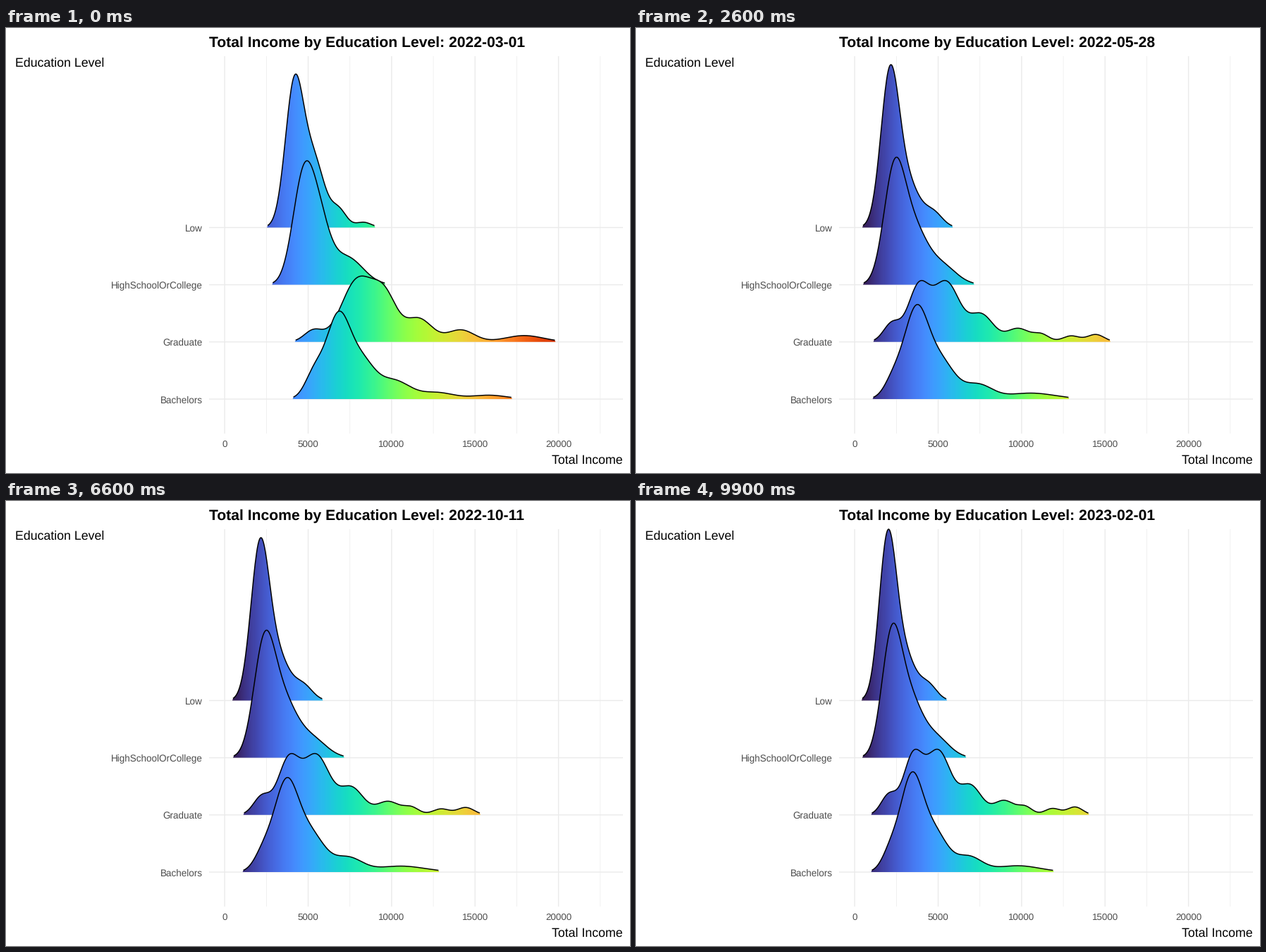
Animation of 885x632 px, one loop 10 s. Source, as a matplotlib script:

```python
import numpy as np
import matplotlib.pyplot as plt
from matplotlib.animation import FuncAnimation
from matplotlib.path import Path

W, H, DPI = 885, 632, 100
FRAMES, INTERVAL = 100, 100
LEFT, RIGHT, TOP, BOTTOM = 288, 875, 40, 576
ZERO, STEP = 310.2, 118.35          # x of income 0, pixels per 5000
LOW, HIGH = 314.7, 848.3            # ends of the colour scale
BASE, ROW = 283.4, 81.2             # first baseline and ridge spacing
CUT = 0.01 * 3 * ROW                # tails lower than this are hidden
GREY = "#4D4D4D"

plt.rcParams["font.family"] = ["Liberation Sans", "DejaVu Sans"]
plt.rcParams["text.hinting"] = "none"

# Each ridge is a sum of bell curves (centre, height, width):
# name, response to the income level, first month, typical later month
GROUPS = [
    ("Low", 0.75,
     [(409, 200, 13), (437, 92, 15), (472, 24, 11), (507, 7.5, 11)],
     [(360, 209, 13), (385, 62, 17), (422, 20, 13)]),
    ("HighSchoolOrCollege", 0.8,
     [(422, 148, 15.5), (445, 69, 15), (483, 39, 23)],
     [(366, 150, 15), (393, 75, 19), (433, 27, 21)]),
    ("Graduate", 1.0,
     [(436, 16, 13), (499, 88, 23), (538, 56, 17), (585, 33, 19),
      (645, 17, 19), (735, 9, 27)],
     [(363, 26, 12), (400.5, 75, 15), (440, 84, 19), (490, 38, 17),
      (542, 19, 16), (575, 10, 11), (617, 8.5, 12), (652, 10.5, 12)]),
    ("Bachelors", 0.87,
     [(437, 34, 13), (471, 115, 17), (505, 48, 18), (550, 26, 23),
      (612, 9, 23), (685, 5.5, 25)],
     [(365, 25, 13), (397, 121, 17), (432, 52, 20), (485, 20, 20),
      (560, 8.5, 34)]),
]

# Later months whose income level is not the typical one
LEVELS = {"2022-04": 0.97, "2022-08": 1.05, "2023-01": 1.03, "2023-02": 0.914}

START = np.datetime64("2022-03-01")
MONTHS = np.arange("2022-03", "2023-03", dtype="datetime64[M]")
DAYS = (MONTHS.astype("datetime64[D]") - START).astype(int)
SPAN = int(DAYS[-1])
KEYS = np.round(DAYS * (FRAMES - 1) / SPAN).astype(int)

X = np.linspace(LOW, HIGH, 512)


def ridge(bells, stretch=1.0):
    """Sum of bells, stretched from income 0 and lowered to match."""
    x = ZERO + (X - ZERO) / stretch
    total = sum(h * np.exp(-0.5 * ((x - c) / w) ** 2) for c, h, w in bells)
    return total * stretch ** -0.75


def month_shapes(month):
    if month == MONTHS[0]:
        return [ridge(first) for _, _, first, _ in GROUPS]
    level = LEVELS.get(str(month), 1.0)
    return [ridge(later, level ** power) for _, power, _, later in GROUPS]


SHAPES = np.array([month_shapes(m) for m in MONTHS])


def heights_at(frame):
    k = min(np.searchsorted(KEYS, frame, side="right") - 1, len(KEYS) - 2)
    t = (frame - KEYS[k]) / (KEYS[k + 1] - KEYS[k])
    return (1 - t) * SHAPES[k] + t * SHAPES[k + 1]


fig = plt.figure(figsize=(W / DPI, H / DPI), dpi=DPI, facecolor="white")
ax = fig.add_axes([0, 0, 1, 1])
ax.axis("off")


def px(size):
    return size * 72 / DPI


def label(x, y, text, size, **kw):
    return ax.text(x, y, text, fontsize=px(size), va="baseline", **kw)


def grid(xs, ys, width):
    ax.plot(xs, ys, color="#EBEBEB", lw=px(width), solid_capstyle="butt",
            snap=False, zorder=1)


for n in range(5):
    x = ZERO + n * STEP
    grid([x + STEP / 2] * 2, [TOP, BOTTOM], 0.7)
    grid([x, x], [TOP, BOTTOM], 1.4)
    label(x, 595, str(5000 * n), 13.4, ha="center", color=GREY)

ramp = np.linspace(0, 1, 1024)[None, :]
bases = BASE + ROW * np.arange(len(GROUPS))
fills, lines = [], []
for n, base in enumerate(bases):
    grid([LEFT, RIGHT], [base, base], 1.4)
    label(279, base + 5.4, GROUPS[n][0], 13.5, ha="right", color=GREY)
    fills.append(ax.imshow(ramp, cmap="turbo", aspect="auto", zorder=2 + n,
                           extent=(LOW, HIGH, H, 0), interpolation="nearest"))
    lines += ax.plot([], [], color="black", lw=px(1.5), zorder=2.5 + n,
                     solid_capstyle="butt")

label(13, 54.5, "Education Level", 17.8)
label(875, 618.7, "Total Income", 17.8, ha="right")
title = label(288.5, 26.5, "", 21.1, weight="bold")
ax.set_xlim(0, W)
ax.set_ylim(H, 0)


def draw(frame):
    date = START + frame * SPAN // (FRAMES - 1)
    title.set_text(f"Total Income by Education Level: {date}")
    for h, base, fill, line in zip(heights_at(frame), bases, fills, lines):
        top = np.where(h >= CUT, base - h, np.nan)
        edge = np.where(h >= CUT, top, base)
        outline = np.column_stack([np.r_[X, HIGH, LOW], np.r_[edge, base, base]])
        fill.set_clip_path(Path(outline), ax.transData)
        line.set_data(X, top)
    return [title, *fills, *lines]


anim = FuncAnimation(fig, draw, frames=FRAMES, interval=INTERVAL,
                     init_func=lambda: draw(0), repeat=True, repeat_delay=0)
plt.show()
```
